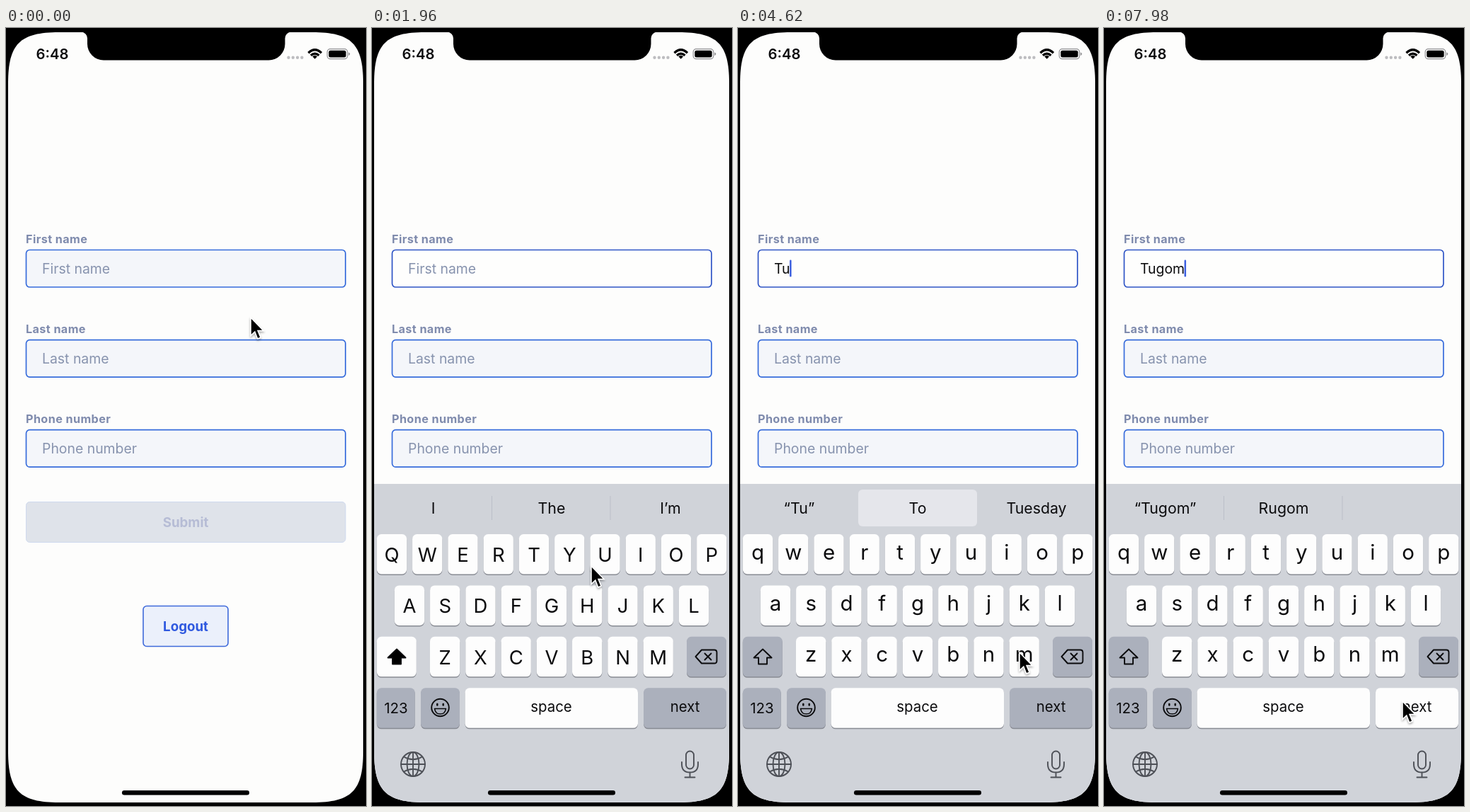
Animation, 509 px wide and 1099 px high, one loop 8000 ms. Source, as an HTML page:

```html
<!DOCTYPE html>
<html lang="en">
<head>
<meta charset="utf-8">
<title>Sign-up form</title>
<style>
  html, body { margin: 0; width: 100%; height: 100%; overflow: hidden; background: #000; }
  svg { display: block; width: 509px; height: 1099px; }
  text { font-family: Inter, Roboto, sans-serif; fill: #0b0b0d; }
  .mid { text-anchor: middle; }
  .label { font-size: 16.2px; font-weight: 700; letter-spacing: .4px; fill: #7f8bad; }
  .entry { font-size: 19.4px; }
  .hint { fill: #8793ae; }
  .button { font-size: 18.7px; font-weight: 700; }
  .field { fill: #f4f6fa; stroke: #376cdb; stroke-width: 1.7; }
  .field.focus { fill: #fefefd; stroke: #2f55c6; }
  .upper { font-size: 27.5px; }
  .lower { font-size: 29.5px; }
  .small { font-size: 20.4px; }
  .suggest { font-size: 21.3px; }
  .line { fill: none; stroke: #0b0b0d; stroke-width: 1.9; stroke-linecap: round; stroke-linejoin: round; }
  .tool { stroke: #4d5057; }
</style>
</head>
<body>
<svg viewBox="0 0 509 1099">
  <defs>
    <clipPath id="screen">
      <path d="M3 78C3 22.500 19.500 6 75 6H433C488.500 6 505 22.500 505 78V1022C505 1077.500 488.500 1094 433 1094H75C19.500 1094 3 1077.500 3 1022Z"/>
    </clipPath>
    <filter id="drop" x="-50%" y="-50%" width="200%" height="200%">
      <feDropShadow dx="0" dy="2" stdDeviation="1.5" flood-opacity=".35"/>
    </filter>
  </defs>
  <rect width="509" height="1099"/>
  <g clip-path="url(#screen)">
    <rect width="509" height="1099" fill="#fdfdfc"/>
    <g id="form"></g>
    <rect id="caret" y="327.5" width="2.5" height="24" rx="1.2" fill="#3c5fdf"/>
    <rect x="28.5" y="669.5" width="451.5" height="57" rx="5" fill="#dfe3ea" stroke="#ced9ee"/>
    <text class="button mid" x="254" y="705" style="fill:#b6bcd5">Submit</text>
    <rect x="194" y="816.5" width="120" height="57" rx="5" fill="#ebf0fb" stroke="#3e69da" stroke-width="1.6"/>
    <text class="button mid" x="254" y="851.5" style="fill:#2f59df">Logout</text>

    <g id="keyboard">
      <rect x="3" y="644" width="502" height="460" fill="#d0d3d9"/>
      <path id="dividers" d="M169.500 661v34M337 661v34" stroke="#bbbfc8"/>
      <rect id="chip" x="170" y="652" width="168" height="52" rx="6" fill="#e5e6eb"/>
      <g id="suggestions"></g>
      <g id="keys"></g>
      <path id="shift" class="line" d="M35 877.500L47.500 889.500H41V898.500H29V889.500H22.500Z"/>
      <g class="line">
        <path d="M466 878.500H484Q487.500 878.500 487.500 882V894Q487.500 897.500 484 897.500H466L457.500 888Z"/>
        <path d="M470.500 883.500l9 9m0-9l-9 9"/>
        <circle cx="96.500" cy="960" r="12.300"/>
        <path d="M88.500 961.500H104.500Q103.500 969 96.500 969T88.500 961.500Z" stroke-width="1.600"/>
        <path d="M92.300 955v1.500M100.700 955v1.500" stroke-width="2.500"/>
      </g>
      <g class="line tool">
        <circle cx="58" cy="1040" r="17"/>
        <ellipse cx="58" cy="1040" rx="8.500" ry="17"/>
        <path d="M58 1023v34M41 1040h34M45 1029.500Q58 1037 71 1029.500M45 1050.500Q58 1043 71 1050.500"/>
        <rect x="444" y="1021.500" width="11" height="25" rx="5.500"/>
        <path d="M438 1037v3q0 11.500 11.500 11.500t11.500-11.500v-3M449.500 1052v6.500M442.500 1058.500h14"/>
      </g>
    </g>
    <rect x="164" y="1077" width="180" height="6.500" rx="3.200"/>
  </g>

  <path d="M106 5.500A9 9 0 0 1 115 14.500V22.500A23 23 0 0 0 138 45.500H371.500A23 23 0 0 0 394.500 22.500V14.500A9 9 0 0 1 403.500 5.500Z"/>
  <text x="42.500" y="43.500" font-size="20.300" font-weight="600">6:48</text>
  <path d="M399.500 41.800h21" stroke="#bdbdc0" stroke-width="4.400" stroke-linecap="round" stroke-dasharray="0 6.300"/>
  <g fill="none" stroke="#000" stroke-width="3.300">
    <path d="M427.500 35.200Q436.700 26.500 446 35.200M431 38.800Q436.700 33.500 442.500 38.800"/>
    <path d="M433.300 40.200Q436.700 37.200 440.100 40.200L436.700 43.800Z" fill="#000" stroke="none"/>
  </g>
  <rect x="454.200" y="29.700" width="28.600" height="14" rx="4.200" fill="none" stroke="#8f8f92" stroke-width="1.200"/>
  <rect x="456.300" y="31.800" width="24.400" height="9.800" rx="2.500"/>
  <path d="M484.300 34.500q2 .6 2 2.200t-2 2.200z" fill="#8f8f92"/>

  <path id="pointer" filter="url(#drop)" d="M0 0V25.500L5.800 20L9.700 30L14 28.200L10 18.500H18Z" stroke="#fff" stroke-width="1.500"/>
</svg>

<script>
const LOOP = 8000;
const $ = id => document.getElementById(id);

function add(parent, tag, attrs, content = '') {
  const el = document.createElementNS('http://www.w3.org/2000/svg', tag);
  for (const name in attrs) el.setAttribute(name, attrs[name]);
  el.textContent = content;
  return parent.appendChild(el);
}

// Form
const [first] = ['First name', 'Last name', 'Phone number'].map((label, i) => {
  const y = 313.5 + i * 127.1, form = $('form');
  add(form, 'text', { class: 'label', x: 28, y: y - 9.5 }, label);
  const box = add(form, 'rect', { class: 'field', x: 28.5, y, width: 451.5, height: 52.5, rx: 5 });
  const entry = add(form, 'text', { class: 'entry hint', x: 51, y: y + 33 }, label);
  return { box, entry };
});

// Keyboard
const GREY = '#abb0bc', WHITE = '#fdfdfd';

function key(x, y, width) {
  add($('keys'), 'rect', { x, y: y + 1.5, width, height: 56.5, rx: 6.5, fill: '#888b93' });
  return add($('keys'), 'rect', { x, y, width, height: 56.5, rx: 6.5, fill: WHITE });
}

const letters = [];
[['QWERTYUIOP', 6.8], ['ASDFGHJKL', 31.8], ['ZXCVBNM', 82]].forEach(([row, left], r) => {
  [...row].forEach((char, i) => {
    const x = left + i * 50.26, y = 715 + r * 72.4;
    key(x, y, 42.3);
    letters.push({ char, y, el: add($('keys'), 'text', { x: x + 21.2 }) });
  });
});
const shiftKey = key(6.8, 859.8, 56);
const deleteKey = key(445, 859.8, 56);
const numberKey = key(6.8, 932.3, 54);
const emojiKey = key(69, 932.3, 55);
key(131.5, 932.3, 244.5);
const nextKey = key(384, 932.3, 117);
for (const k of [deleteKey, numberKey, emojiKey]) k.setAttribute('fill', GREY);
add($('keys'), 'text', { class: 'small mid', x: 34, y: 967.5 }, '123');
add($('keys'), 'text', { class: 'small mid', x: 253.5, y: 966 }, 'space');
add($('keys'), 'text', { class: 'small mid', x: 442.5, y: 966 }, 'next');

const suggestions = [86.5, 254, 422].map(x =>
  add($('suggestions'), 'text', { class: 'suggest mid', x, y: 686 }));

// Timeline
const FOCUS = 960, RISE = 449, NEXT_DOWN = 7900;

const typing = [
  { at: 0, text: '', words: ['I', 'The', 'I’m'] },
  { at: 2400, text: 'T', words: ['“T”', 'The', 'To'] },
  { at: 3500, text: 'Tu', words: ['“Tu”', 'To', 'Tuesday'], chip: true },
  { at: 4695, text: 'Tug', words: ['“Tug”', 'Tugging', 'Tugs'] },
  { at: 5580, text: 'Tugo', words: ['“Tugo”', '', ''] },
  { at: 6860, text: 'Tugom', words: ['“Tugom”', '', ''] },
  { at: 7000, text: 'Tugom', words: ['“Tugom”', 'Rugom', ''] }
];

// Pointer stops: time, x, y
const stops = [
  [0, 346, 409], [760, 231, 346], [1300, 231, 346], [1960, 310, 760],
  [2260, 353, 812], [2520, 353, 812], [3260, 57, 800], [3860, 57, 800],
  [4520, 398, 882], [4780, 398, 882], [5400, 130, 757], [5700, 130, 757],
  [6500, 108, 808], [7100, 108, 808], [7840, 422, 951], [LOOP, 422, 951]
];

const clamp = v => Math.max(0, Math.min(1, v));
const smooth = v => v * v * (3 - 2 * v);

function pointerAt(t) {
  const i = stops.findIndex(s => s[0] > t);
  const [t0, x0, y0] = stops[i - 1], [t1, x1, y1] = stops[i];
  const p = smooth((t - t0) / (t1 - t0));
  return [x0 + (x1 - x0) * p, y0 + (y1 - y0) * p];
}

// Solid, fade out, hidden, fade in; restarts with every keystroke.
function caretAlpha(elapsed) {
  const phase = elapsed % 1100;
  return phase < 900 ? 1 - clamp((phase - 650) / 150) : clamp((phase - 1020) / 80);
}

function keyboardOffset(t) {
  const wt = Math.max(0, t - FOCUS) * 0.0165;
  return RISE * (1 + wt) * Math.exp(-wt);
}

let shown;
function showState(state) {
  if (state === shown) return;
  shown = state;
  const { text, words, chip } = state;
  first.entry.textContent = text || 'First name';
  first.entry.classList.toggle('hint', !text);
  words.forEach((word, i) => suggestions[i].textContent = word);
  $('chip').style.display = chip ? '' : 'none';
  $('dividers').style.display = chip ? 'none' : '';
  for (const { char, y, el } of letters) {
    el.textContent = text ? char.toLowerCase() : char;
    el.setAttribute('class', text ? 'lower mid' : 'upper mid');
    el.setAttribute('y', y + (text ? 35.5 : 38.7));
  }
  shiftKey.setAttribute('fill', text ? GREY : WHITE);
  $('shift').style.fill = text ? 'none' : '#000';
  const width = text ? first.entry.getComputedTextLength() : 0;
  $('caret').setAttribute('x', 50.5 + width);
}

function draw() {
  const t = performance.now() % LOOP;
  const state = typing.findLast(s => s.at <= t);
  showState(state);

  const focused = t >= FOCUS - 20;
  first.box.classList.toggle('focus', focused);
  const stroke = typing.find(s => s.text === state.text);
  $('caret').style.opacity = focused ? caretAlpha(Math.max(0, t - Math.max(FOCUS, stroke.at))) : 0;

  $('keyboard').setAttribute('transform', `translate(0 ${keyboardOffset(t)})`);
  $('keyboard').style.display = t < FOCUS ? 'none' : '';
  nextKey.setAttribute('fill', t >= NEXT_DOWN ? WHITE : GREY);
  $('pointer').setAttribute('transform', `translate(${pointerAt(t)})`);
  requestAnimationFrame(draw);
}
draw();
</script>
</body>
</html>
```
